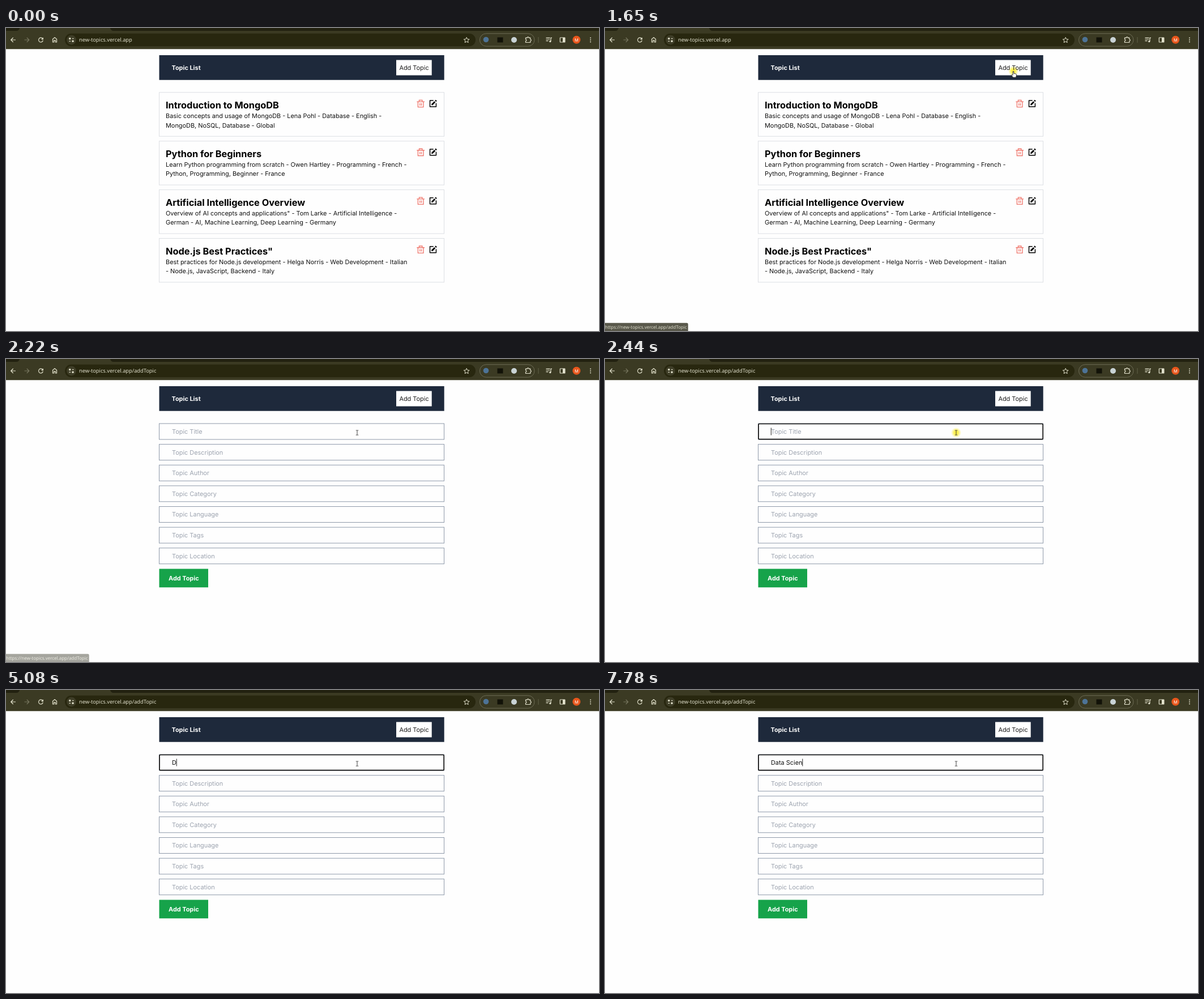
These frames come from a looping animation (1047 by 535 pixels, 8 s). An HTML page:

```html
<!DOCTYPE html>
<html lang="en">
<head>
<meta charset="utf-8">
<title>Topic List</title>
<style>
  html, body { margin: 0; width: 100%; height: 100%; overflow: hidden; background: #fefefe; }
  svg { display: block; width: 1047px; height: 535px; }
  text { font: 10.91px Inter, sans-serif; text-rendering: geometricPrecision; font-optical-sizing: none; white-space: pre; }
  .bold { font-weight: 700; }
  .title { font-size: 16.36px; font-weight: 700; }
  .hint { fill: #9ca3af; }
  .chrome { font: 9.3px "Open Sans", sans-serif; }
  .line { fill: none; stroke: #e3e2cd; stroke-width: 1.2; }
  .white { fill: #fff; }
</style>
</head>
<body>
<svg viewBox="0 0 1047 535">
  <defs>
    <g id="trash" fill="none" stroke="#f0796f" stroke-width="2">
      <path d="M2 7H22M5 7V21H19V7M8 7V3H16V7M10 11V17M14 11V17"/>
    </g>
    <g id="edit">
      <path d="M19 2l3 3-2.3 2.3-3-3zM8 16h3l7.3-7.3-3-3L8 13z"/>
      <path d="M13 4H4V20H20V11" fill="none" stroke="#000" stroke-width="2.2" stroke-linejoin="round"/>
    </g>
    <radialGradient id="glow">
      <stop offset=".35" stop-color="#fff04a"/>
      <stop offset="1" stop-color="#fff04a" stop-opacity="0"/>
    </radialGradient>
  </defs>

  <g id="browser">
    <path fill="#3b3a23" d="M0 0H1047V37.3H0z"/>
    <path fill="#222110" d="M0 0H24Q23 5 18 5H0zM184 0H1047V5H190Q185 5 184 0z"/>
    <rect x="104" y="9.8" width="725" height="22.4" rx="11.2" fill="#28270f"/>
    <circle cx="115.5" cy="21" r="8.4" fill="#3e3d27"/>
    <g class="line">
      <path d="M17 21H9M12.7 17L8.7 21L12.7 25"/>
      <path d="M32.500 21H40.500M36.800 17L40.800 21L36.800 25" stroke="#77765f"/>
      <path d="M64.800 19A3.900 3.900 0 1 0 65.300 22M65.300 17V19.800H62.500"/>
      <path d="M82.500 25V19.500L86 16.800L89.500 19.500V25H87.300V21.800H84.700V25z"/>
      <path d="M111.500 18.700H114M117 18.700H119.500M111.500 23.300H114M117 23.300H119.500"/>
      <circle cx="112.800" cy="18.700" r="1.200"/><circle cx="118" cy="23.300" r="1.200"/>
      <path d="M813.200 16.500l1.400 3.200 3.500.3-2.700 2.300.8 3.400-3-1.800-3 1.800.8-3.400-2.700-2.300 3.500-.3z" stroke-width="1"/>
      <rect x="836.500" y="9.800" width="96.500" height="22.400" rx="11.200" stroke="#6d6c55" stroke-width="1"/>
      <path d="M917.500 17.300H920.200A1.500 1.500 0 0 1 923.200 17.300H925.800V20A1.500 1.500 0 0 1 925.800 23V25.500H917.500V23A1.500 1.500 0 0 0 917.500 20z"/>
      <path d="M940 16V26" stroke="#5d5c43"/>
      <path d="M953.500 17.300H960.500M953.500 20H960.500M953.500 22.700H957.500M962 23.500V17.300H964"/>
      <rect x="978.300" y="17" width="8.600" height="8" rx=".6"/>
    </g>
    <g fill="#e3e2cd">
      <path d="M983 17H987V25H983z"/>
      <circle cx="960.800" cy="23.700" r="1.600"/>
      <circle cx="1032" cy="17.400" r="1"/><circle cx="1032" cy="21" r="1"/><circle cx="1032" cy="24.600" r="1"/>
    </g>
    <circle cx="847.500" cy="20.500" r="4.800" fill="#4d7396"/>
    <rect x="867.500" y="16.500" width="10" height="9" fill="#121208"/>
    <circle cx="897" cy="21" r="5" fill="#c9d3d6"/>
    <circle cx="1007.300" cy="20.700" r="7" fill="#e8561c"/>
    <text class="white" x="1007.300" y="23.500" text-anchor="middle" style="font-size:7.500px">M</text>
    <text class="chrome" id="url" x="129" y="24.400" fill="#ecebd8"></text>
  </g>

  <g id="header">
    <path fill="#1e293b" d="M270.500 48H773.700V91.800H270.500z"/>
    <path fill="#fff" d="M689 56.400H751.700V83.600H689z"/>
    <text class="bold white" x="292.500" y="74">Topic List</text>
    <text x="694.400" y="74" fill="#1c1c1c">Add Topic</text>
  </g>

  <g id="list"></g>
  <g id="form">
    <g id="fields"></g>
    <rect id="focus" x="271" y="114.500" width="502.200" height="27.200" rx="1.500" fill="none" stroke="#101010" stroke-width="1.700"/>
    <text id="typed" x="293" y="132" fill="#111"></text>
    <rect id="caret" y="121.500" width="1" height="13" fill="#222"/>
    <path fill="#16a34a" d="M270.500 370.400H357V403.200H270.500z"/>
    <text class="bold white" x="287" y="390.800">Add Topic</text>
  </g>

  <g id="status">
    <path fill="#222110" d="M0 520.700H144.500Q146.700 520.700 146.700 523V535H0z"/>
    <text class="chrome" x="0" y="531" fill="#dddcc4" style="font-size:8px">https://new-topics.vercel.app/addTopic</text>
  </g>

  <g id="pointer">
    <circle id="click" r="9" fill="url(#glow)" style="mix-blend-mode:multiply"/>
    <path id="arrow" d="M0 0V10.500L2.500 8.200L4.200 12L5.900 11.200L4.300 7.600H7.600z" fill="#fff" stroke="#222" stroke-width=".8"/>
    <path id="hand" d="M-.9 .8Q0-.7 .9 .8V4.300L4.600 5.100Q5.700 5.500 5.500 7L4.700 11.200H-.5L-3.700 7.300Q-3.400 5.800-.9 7.300z" fill="#fff" stroke="#222" stroke-width=".9"/>
    <path id="beam" d="M-2.200-4H-.5L0-3.600L.5-4H2.200M0-3.600V3.800M-2.200 4.200H-.5L0 3.800L.5 4.200H2.200" fill="none" stroke="#333" stroke-width=".9"/>
  </g>
</svg>
<script>
const LOOP = 8000;
const el = Object.fromEntries([...document.querySelectorAll('svg [id]')].map(e => [e.id, e]));

const topics = [
  ['Introduction to MongoDB',
   'Basic concepts and usage of MongoDB - Lena Pohl - Database - English -',
   'MongoDB, NoSQL, Database - Global'],
  ['Python for Beginners',
   'Learn Python programming from scratch - Owen Hartley - Programming - French -',
   'Python, Programming, Beginner - France'],
  ['Artificial Intelligence Overview',
   'Overview of AI concepts and applications" - Tom Larke - Artificial Intelligence -',
   'German - AI, Machine Learning, Deep Learning - Germany'],
  ['Node.js Best Practices"',
   'Best practices for Node.js development - Helga Norris - Web Development - Italian',
   '- Node.js, JavaScript, Backend - Italy'],
];
const box = (y, h, color) =>
  `<rect x="270.5" y="${y}" width="503" height="${h}" fill="none" stroke="${color}"/>`;

el.list.innerHTML = topics.map(([title, first, second], i) => `
  <g transform="translate(0 ${i * 85.9})">
    ${box(113.8, 77.4, '#dcdfe4')}
    <text class="title" x="282" y="142">${title}</text>
    <text x="282" y="159.200" fill="#111">${first}</text>
    <text x="282" y="175.600" fill="#111">${second}</text>
    <use href="#trash" transform="translate(724 125.3) scale(.682)"/>
    <use href="#edit" transform="translate(745.8 125.3) scale(.682)"/>
  </g>`).join('');

const fields = ['Title', 'Description', 'Author', 'Category', 'Language', 'Tags', 'Location'];
el.fields.innerHTML = fields.map((name, i) => `
  <g transform="translate(0 ${i * 36.62})">
    ${box(114, 28, '#8e99aa')}
    <text class="hint" x="293" y="132">Topic ${name}</text>
  </g>`).join('');
const titleHint = el.fields.querySelector('text');

const phrase = 'Data Scien';
const keyTimes = [5080, 5290, 5360, 5510, 5720, 6230, 6510, 6720, 7570, 7780];
const caretOff = [[2940, 3510], [4010, 4510], [7220, 7570]];

// Pointer path: step, x, y
const path = [[0, 1016, 513], [10, 756, 114], [13, 721, 76], [17, 721, 76], [23, 620, 130]];

function pointerAt(step) {
  const i = path.findIndex(p => p[0] > step);
  if (i < 0) return path.at(-1).slice(1);
  const [a, b] = [path[i - 1], path[i]];
  const u = (step - a[0]) / (b[0] - a[0]);
  const e = u * u * (3 - 2 * u);
  return [a[1] + (b[1] - a[1]) * e, a[2] + (b[2] - a[2]) * e];
}

const show = (node, on) => node.setAttribute('visibility', on ? 'inherit' : 'hidden');

function statusOpacity(step) {
  if (step < 15) return 0;
  if (step < 17) return step === 15 ? .4 : .75;
  return Math.max(0, Math.min(1, (26 - step) / 5));
}

function render(t) {
  const step = Math.floor((t - 479) / 72.5);
  const adding = t >= 1730, focused = t >= 2440;

  show(el.list, !adding);
  show(el.form, adding);
  el.url.textContent = 'new-topics.vercel.app' + (adding ? '/addTopic' : '');
  el.status.setAttribute('opacity', statusOpacity(step));

  const text = phrase.slice(0, keyTimes.filter(k => t >= k).length);
  el.typed.textContent = text;
  show(titleHint, adding && !text);
  show(el.focus, adding && focused);
  show(el.caret, focused && !caretOff.some(([from, to]) => t >= from && t < to));
  el.caret.setAttribute('x', 292.8 + (text ? el.typed.getComputedTextLength() : 0));

  show(el.pointer, step >= 0);
  if (step < 0) return;
  const [x, y] = pointerAt(step);
  const onButton = x > 689 && x < 752 && y > 56 && y < 84;
  const onField = adding && y > 114;
  el.pointer.setAttribute('transform', `translate(${x} ${y})`);
  show(el.hand, onButton);
  show(el.beam, onField);
  show(el.arrow, !onButton && !onField);
  show(el.click, step === 15 || step === 16 || step === 27);
}

function tick() {
  render(performance.now() % LOOP);
  requestAnimationFrame(tick);
}
tick();
</script>
</body>
</html>
```
